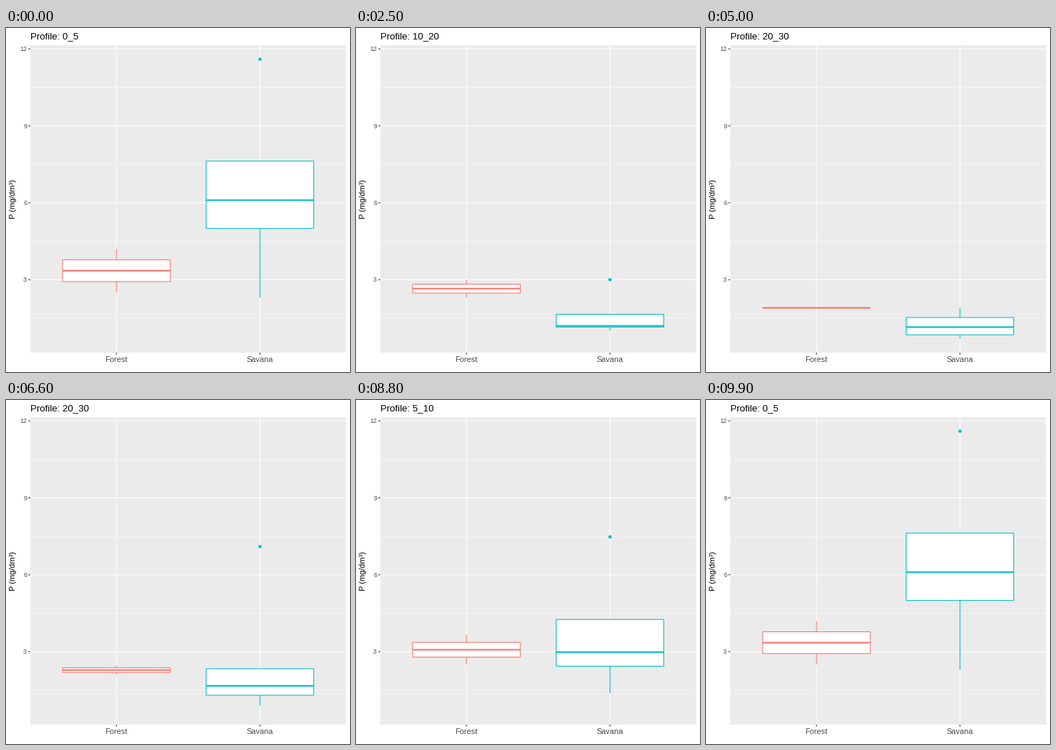
Write a matplotlib script that moves like this. It is 480 px wide and 480 px high and loops after 10 s.

```python
import numpy as np
import matplotlib.pyplot as plt
from matplotlib.animation import FuncAnimation
from matplotlib.patches import Circle, Rectangle

SIZE, DPI = 480, 80
PT = 72 / DPI                      # points per pixel
LEFT, RIGHT, TOP, BOTTOM = 33.98, 474.52, 24.0, 452.95
Y_MIN, Y_MAX = 0.155, 12.145
LINE = 1.07
FRAMES, STEP_MS = 100, 100

SAMPLES = {
    "0_5": ([2.5, 4.2], [2.3, 5.9, 6.3, 11.6]),
    "10_20": ([2.3, 3.0], [1.0, 1.2, 1.2, 3.0]),
    "20_30": ([1.9, 1.9], [0.7, 0.9, 1.4, 1.9]),
    "5_10": ([2.5, 3.6], [1.3, 2.5, 2.9, 7.1]),
}
PROFILES = list(SAMPLES)
MOVES = [(12, 25), (38, 50), (62, 74), (87, 99)]
GROUPS = [("Forest", "#F8766D"), ("Savana", "#00BFC4")]


def x_px(v):
    return LEFT + (v - 0.4) / 2.2 * (RIGHT - LEFT)


def y_px(v):
    return BOTTOM - (v - Y_MIN) / (Y_MAX - Y_MIN) * (BOTTOM - TOP)


def box_stats(values):
    """Whisker ends, quartiles and the outlier (nan if there is none)."""
    v = np.array(values)
    q1, med, q3 = np.percentile(v, [25, 50, 75])
    reach = 1.5 * (q3 - q1) + 1e-9
    inside = (v >= q1 - reach) & (v <= q3 + reach)
    out = v[~inside]
    return np.array([v[inside].min(), q1, med, q3, v[inside].max(),
                     out[0] if out.size else np.nan])


STATS = {p: [box_stats(s) for s in pair] for p, pair in SAMPLES.items()}


def tween(a, b, t):
    if t == 0:
        return a
    if t == 1:
        return b
    mix = a + (b - a) * t
    # an outlier without a partner stays put during the move
    if np.isnan(mix[5]):
        mix[5] = b[5] if np.isnan(a[5]) else a[5]
    return mix


def phase(frame):
    """Index of the current profile and progress towards the next."""
    for i, (start, end) in enumerate(MOVES):
        if frame < end:
            return i, max(0.0, (frame - start) / (end - start))
    return 0, 0.0


fig = plt.figure(figsize=(SIZE / DPI, SIZE / DPI), dpi=DPI, facecolor="white")
ax = fig.add_axes([0, 0, 1, 1])
ax.set_xlim(0, SIZE)
ax.set_ylim(SIZE, 0)
ax.axis("off")


def line(xs, ys, color, width=LINE, z=1):
    artist, = ax.plot(xs, ys, color=color, lw=width * PT, zorder=z,
                      solid_capstyle="butt")
    artist.set_snap(False)
    return artist


def label(x, y, text, size, color="black", **kw):
    return ax.text(x, y, text, fontsize=size * PT, color=color,
                   family="Liberation Sans", va="baseline", **kw)


def draw_panel():
    ax.add_patch(Rectangle((LEFT, TOP), RIGHT - LEFT, BOTTOM - TOP,
                           fc="#EBEBEB", lw=0, zorder=0, snap=False))
    for v in (1.5, 4.5, 7.5, 10.5):
        line([LEFT, RIGHT], [y_px(v)] * 2, "white", LINE / 2)
    for v in (3, 6, 9, 12):
        y = y_px(v)
        line([LEFT, RIGHT], [y, y], "white")
        line([LEFT - 2.74, LEFT], [y, y], "#333333")
        label(LEFT - 4.94, y + 3.15, str(v), 8.8, "#4D4D4D", ha="right")
    for i, (name, _) in enumerate(GROUPS):
        x = x_px(i + 1)
        line([x, x], [TOP, BOTTOM], "white")
        line([x, x], [BOTTOM, BOTTOM + 2.74], "#333333")
        label(x, 466, name, 11, "#4D4D4D", ha="center")
    ax.text(13.2, (TOP + BOTTOM) / 2, "P (mg/dm³)", fontsize=11 * PT,
            family="Liberation Sans", rotation=90, rotation_mode="anchor",
            ha="center", va="baseline")


class Box:
    def __init__(self, pos, color):
        x, x0, x1 = x_px(pos), x_px(pos - 0.375), x_px(pos + 0.375)
        self.dot = ax.add_patch(Circle((x, 0), 2.3, fc=color, lw=0, zorder=3))
        self.whiskers = [line([x, x], [0, 0], color, z=4) for _ in range(2)]
        self.body = ax.add_patch(Rectangle(
            (x0, 0), x1 - x0, 0, fc="white", ec=color, lw=LINE * PT,
            joinstyle="miter", zorder=5, snap=False))
        self.median = line([x0, x1], [0, 0], color, 2 * LINE, z=6)
        self.x = x

    def artists(self):
        return [self.dot, *self.whiskers, self.body, self.median]

    def show(self, stats):
        low, q1, med, q3, high, out = y_px(stats)
        self.whiskers[0].set_ydata([q1, low])
        self.whiskers[1].set_ydata([q3, high])
        self.body.set_y(q3)
        self.body.set_height(q1 - q3)
        self.median.set_ydata([med, med])
        self.dot.set_visible(not np.isnan(out))
        if not np.isnan(out):
            self.dot.center = (self.x, out)


draw_panel()
title = label(LEFT, 15, "", 13.2)
boxes = [Box(i + 1, color) for i, (_, color) in enumerate(GROUPS)]


def update(frame):
    i, t = phase(frame)
    here, there = PROFILES[i], PROFILES[(i + 1) % len(PROFILES)]
    title.set_text("Profile: " + (there if t > 0.5 else here))
    for box, a, b in zip(boxes, STATS[here], STATS[there]):
        box.show(tween(a, b, t))
    return [title] + [a for box in boxes for a in box.artists()]


anim = FuncAnimation(fig, update, frames=FRAMES, interval=STEP_MS,
                     init_func=lambda: update(0), repeat=True, repeat_delay=0)
plt.show()
```
